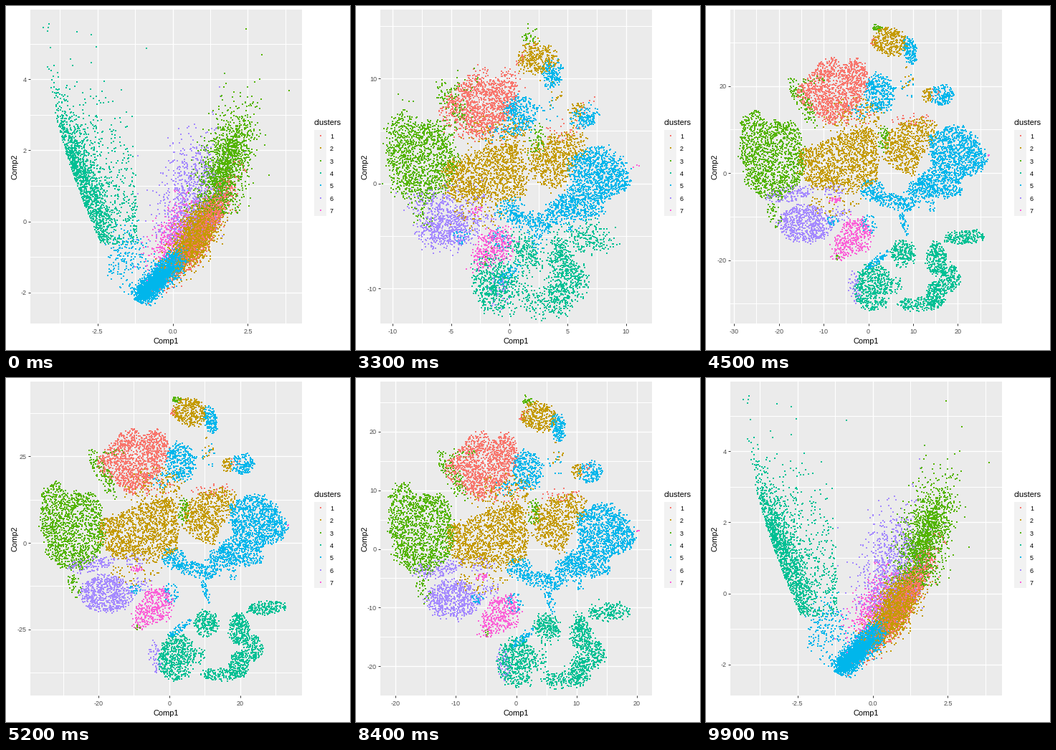
These frames come from a looping animation (480 px wide and 480 px high, 10 s). A matplotlib script:

```python
import math

import matplotlib.pyplot as plt
import numpy as np
from matplotlib.animation import FuncAnimation
from matplotlib.path import Path
from matplotlib.patches import Rectangle

plt.rcParams["font.family"] = "Liberation Sans"
SIZE, DPI, FRAMES = 480, 96, 100
PT = 72 / DPI  # points per pixel
LEFT, RIGHT, TOP, BOTTOM = 34, 413, 5, 443
COLORS = ["#F8766D", "#C49A00", "#53B400", "#00C094", "#00B6EB", "#A58AFF", "#FB61D7"]
SALMON, GOLD, GREEN, TEAL, BLUE, PURPLE, PINK = range(7)

# View limits as the blend goes from the first layout (0) to the second (1)
BLEND = [0, 0.04, 0.12, 0.6, 0.96, 1]
X_LOW = [-4.73, -3.83, -2.9, -22.5, -37.5, -39.2]
X_HIGH = [4.30, 2.68, 4.9, 22.5, 35.75, 37.4]
Y_LOW = [-2.87, -3.04, -5.0, -25.0, -42.2, -44.1]
Y_HIGH = [5.96, 6.22, 8.0, 28.55, 44.75, 46.6]

rng = np.random.default_rng(7)


# ---- second layout: islands of points, outlined in stage pixels ----
groups, islands = [], []


def add(group, px, py):
    groups.append(np.full(len(px), group))
    islands.append(np.column_stack([(px - 228) / 4.95, (230 - py) / 4.84]))


def blob(group, n, cx, cy, rx, ry, tilt=0):
    ang = rng.uniform(0, 2 * np.pi, n)
    rad = np.sqrt(rng.uniform(0, 1, n)) * (1 + 0.07 * rng.normal(size=n))
    u, v = rx * rad * np.cos(ang), ry * rad * np.sin(ang)
    c, s = math.cos(math.radians(tilt)), math.sin(math.radians(tilt))
    add(group, cx + c * u - s * v, cy + s * u + c * v)


def area(group, n, *corners):
    pts = np.array(corners, float)
    trial = rng.uniform(pts.min(0), pts.max(0), (n * 5, 2))
    inside = trial[Path(pts).contains_points(trial)][:n]
    inside = inside + rng.normal(0, 1.6, inside.shape)
    add(group, inside[:, 0], inside[:, 1])


area(SALMON, 1200, (128, 112), (150, 90), (160, 76), (177, 69), (190, 82), (212, 69),
     (225, 85), (228, 108), (215, 130), (198, 150), (172, 162), (145, 142), (130, 130))
blob(SALMON, 60, 200, 150, 38, 15)
blob(SALMON, 12, 233, 48, 4, 7)
blob(SALMON, 30, 290, 156, 32, 10)
blob(SALMON, 8, 318, 115, 8, 8)

blob(GOLD, 330, 257, 47, 25, 19, 20)
area(GOLD, 1250, (130, 198), (160, 188), (200, 172), (234, 168), (242, 205),
     (238, 240), (205, 258), (150, 250), (132, 228))
blob(GOLD, 190, 208, 155, 42, 32)
area(GOLD, 620, (246, 180), (270, 160), (300, 152), (320, 162), (318, 182),
     (300, 205), (290, 232), (268, 225), (250, 212))
blob(GOLD, 45, 309, 121, 7, 10)
blob(GOLD, 14, 283, 100, 8, 24)
blob(GOLD, 45, 180, 274, 38, 16)

area(GREEN, 1350, (50, 160), (70, 143), (84, 160), (116, 160), (130, 168), (136, 198),
     (138, 228), (126, 252), (104, 268), (76, 265), (56, 246), (49, 210))
blob(GREEN, 120, 135, 133, 10, 38, -28)
blob(GREEN, 30, 239, 30, 6, 5)
blob(GREEN, 60, 247, 185, 8, 18)
blob(GREEN, 40, 95, 289, 8, 20, -20)
blob(GREEN, 8, 184, 348, 4, 3)
blob(GREEN, 20, 152, 103, 16, 4)

blob(BLUE, 170, 286, 58, 9, 20, -12)
blob(BLUE, 330, 244, 118, 21, 27)
blob(BLUE, 150, 330, 119, 17, 15)
area(BLUE, 1350, (312, 178), (344, 160), (370, 170), (382, 186), (394, 210), (382, 228),
     (358, 236), (357, 258), (330, 263), (300, 250), (296, 236), (318, 218))
blob(BLUE, 130, 234, 252, 18, 15, 30)
blob(BLUE, 190, 266, 268, 29, 11, 12)
blob(BLUE, 150, 300, 254, 18, 17)
blob(BLUE, 40, 279, 298, 4, 16, -20)
blob(BLUE, 25, 180, 295, 8, 6)
blob(BLUE, 45, 230, 300, 11, 15)
blob(BLUE, 70, 243, 349, 20, 5, -38)
blob(BLUE, 12, 318, 274, 7, 9)
blob(BLUE, 14, 283, 102, 9, 24)
blob(BLUE, 25, 212, 143, 15, 12)

blob(PURPLE, 640, 140, 301, 36, 26)
blob(PURPLE, 150, 119, 260, 32, 11, -10)
blob(PURPLE, 50, 208, 389, 8, 23, -8)
blob(PURPLE, 30, 190, 288, 18, 9)
blob(PURPLE, 30, 180, 255, 15, 10)

area(PINK, 380, (177, 347), (184, 317), (200, 294), (220, 293), (234, 310),
     (229, 334), (210, 340), (190, 351))
blob(PINK, 30, 182, 266, 9, 4)
blob(PINK, 3, 394, 205, 2, 2)

blob(TEAL, 520, 238, 390, 25, 33, 8)
blob(TEAL, 220, 280, 343, 17, 18)
blob(TEAL, 190, 364, 321, 28, 9, -6)
blob(TEAL, 240, 325, 350, 14, 22)
blob(TEAL, 170, 345, 377, 14, 18)
blob(TEAL, 200, 325, 400, 14, 18)
blob(TEAL, 160, 300, 414, 26, 9)
blob(TEAL, 30, 270, 388, 9, 13)

group = np.concatenate(groups)
second = np.vstack(islands)


# ---- first layout: a V of overlapping clouds ----
def bounce(v, floor):
    return floor + np.abs(v - floor)


def cloud(kind, y2):
    n = len(y2)
    a, b = rng.normal(size=(2, n))
    if kind == SALMON:
        x, y = 1.05 + 0.48 * a, -0.15 + 0.6 * a + 0.3 * b
    elif kind == GOLD:
        x, y = 0.75 + 0.38 * a, -0.4 + 0.27 * a + 0.36 * b
    elif kind == GREEN:
        x, y = 1.75 + 0.45 * a, bounce(1.5 + 0.45 * a + 0.72 * b, 0.2)
    elif kind == TEAL:
        y = bounce(1.2 + 1.15 * a, -0.65)
        wide = (rng.random(n) < 0.22) * rng.uniform(0, 1.8, n)
        x = -2.7 - 0.5 * y + 0.035 * y**2 + 0.42 * np.abs(b) + wide
        x = np.minimum(x, -1.15 - 0.1 * np.abs(b))
    elif kind == BLUE:
        t = rng.uniform(-0.75, 0.75, n) + 0.012 * (y2 - 5) + 0.1 * a
        x, y = -0.45 + 0.85 * t - 0.11 * b, -1.6 + 0.7 * t + 0.12 * b
        tail = y2 < -12
        x = np.where(tail, -1.55 + 0.35 * a, x)
        y = np.where(tail, -1.0 + 0.4 * b, y)
    elif kind == PURPLE:
        x, y = 0.65 + 0.55 * a, bounce(0.65 + 0.3 * a + 0.8 * b, -0.6)
    else:
        x, y = 0.05 + 0.4 * a, -0.3 + 0.3 * a + 0.4 * b
    edge = -2.4 + 0.38 * np.abs(x + 0.8) + 0.12 * (x + 0.8) ** 2
    return np.column_stack([np.clip(x, -4.3, 3.8), np.minimum(bounce(y, edge), 5.45)])


first = np.zeros_like(second)
for g in range(7):
    first[group == g] = cloud(g, second[group == g, 1])

# Far strays: group, place in the first layout, place in the second
STRAYS = [(GREEN, 2.45, 5.42, -35, 15), (GREEN, 2.97, 4.7, -35, 15),
          (GREEN, 3.87, 3.68, -30, 6), (GREEN, 3.2, 1.3, -22, -3),
          (TEAL, -4.1, 5.55, 16, -37), (TEAL, -4.3, 5.45, 20, -38),
          (TEAL, -0.86, 4.87, 2, -36), (TEAL, -3.17, 5.33, 25, -18)]
strays = np.array(STRAYS)
group = np.append(group, strays[:, 0].astype(int))
first = np.vstack([first, strays[:, 1:3]])
second = np.vstack([second, strays[:, 3:]])

order = rng.permutation(len(group))
group, first, second = group[order], first[order], second[order]


# ---- axis breaks: best mix of simplicity, coverage and density ----
def breaks(lo, hi, want=5):
    best, span = (-9, 0, 1, 1), hi - lo
    for i, q in enumerate((1, 5, 2, 2.5, 4, 3)):
        for k in range(2, 10):
            z0 = math.ceil(math.log10(span / (k + 1) / q))
            for z in (z0, z0 + 1):
                step = q * 10.0**z
                start = math.floor(hi / step) - k + 1
                for s in range(start, math.ceil(lo / step) + 1):
                    a, b = s * step, (s + k - 1) * step
                    simple = 1 - i / 5 - 1 + (a <= 0 <= b)
                    cover = 1 - 0.5 * ((hi - b) ** 2 + (lo - a) ** 2) / (0.1 * span) ** 2
                    r = (k - 1) / (b - a)
                    rt = (want - 1) / (max(b, hi) - min(a, lo))
                    dense = 2 - max(r / rt, rt / r)
                    score = 0.25 * simple + 0.2 * cover + 0.5 * dense + 0.05
                    if score > best[0]:
                        best = (score, s, k, step)
    _, s, k, step = best
    major = np.arange(s, s + k) * step
    minor = (np.arange(s - 1, s + k) + 0.5) * step
    inside = lambda v: v[(v >= lo) & (v <= hi)]
    return inside(major), inside(minor)


def set_axis(axis, lo, hi):
    major, minor = breaks(lo, hi)
    fmt = "%d" if np.allclose(major, np.round(major)) else "%.1f"
    axis.set_ticks(major, labels=[fmt % round(v, 6) for v in major])
    axis.set_ticks(minor, minor=True)


# ---- stage ----
fig = plt.figure(figsize=(SIZE / DPI, SIZE / DPI), dpi=DPI, facecolor="white")
ax = fig.add_axes([LEFT / SIZE, 1 - BOTTOM / SIZE,
                   (RIGHT - LEFT) / SIZE, (BOTTOM - TOP) / SIZE], facecolor="#EBEBEB")
for spine in ax.spines.values():
    spine.set_visible(False)
ax.set_axisbelow(True)
ax.grid(which="major", color="white", linewidth=1.4 * PT)
ax.grid(which="minor", color="white", linewidth=1 * PT)
ax.tick_params(which="major", length=2.75 * PT, width=1 * PT, color="#333333",
               labelcolor="#4D4D4D", labelsize=9 * PT)
ax.tick_params(which="minor", length=0)
ax.tick_params(axis="x", pad=4.6 * PT)
ax.tick_params(axis="y", pad=2.2 * PT)


def dots(axes, xy, colors):
    return axes.scatter(xy[:, 0], xy[:, 1], s=(2 * PT) ** 2, c=colors, marker="s",
                        linewidths=0, edgecolors="none", antialiased=False, snap=True)


def label(x, y, text, size, **kw):
    fig.text(x / SIZE, 1 - y / SIZE, text, fontsize=size * PT, color="black", **kw)


label(223, 468, "Comp1", 11, ha="center", va="center")
label(12, 224, "Comp2", 11, ha="center", va="center", rotation=90)
label(430, 166, "clusters", 11)

KEY = 17.28
page = fig.add_axes([0, 0, 1, 1])
page.set(xlim=(0, SIZE), ylim=(SIZE, 0))
page.axis("off")
page.add_patch(Rectangle((430, 172.5), KEY, 7 * KEY, facecolor="#F2F2F2", linewidth=0))
keys = np.array([(438.6, 172.5 + KEY * (i + 0.5)) for i in range(7)])
dots(page, keys, COLORS)
for i, (_, y) in enumerate(keys):
    label(452, y + 4, str(i + 1), 9)

points = dots(ax, first, np.array(COLORS)[group])


def blend(i):
    if i <= 25:
        return 0.0
    if i <= 50:
        return (i - 25) / 25
    if i <= 74:
        return 1.0
    return 1 - (i - 74) / 25


def update(i):
    w = blend(i)
    points.set_offsets((1 - w) * first + w * second)
    x0, x1, y0, y1 = (np.interp(w, BLEND, v) for v in (X_LOW, X_HIGH, Y_LOW, Y_HIGH))
    set_axis(ax.xaxis, x0, x1)
    set_axis(ax.yaxis, y0, y1)
    ax.set_xlim(x0, x1)
    ax.set_ylim(y0, y1)
    return (points,)


anim = FuncAnimation(fig, update, frames=FRAMES, interval=100,
                     init_func=lambda: update(0), repeat=True, blit=False)
plt.show()
```
